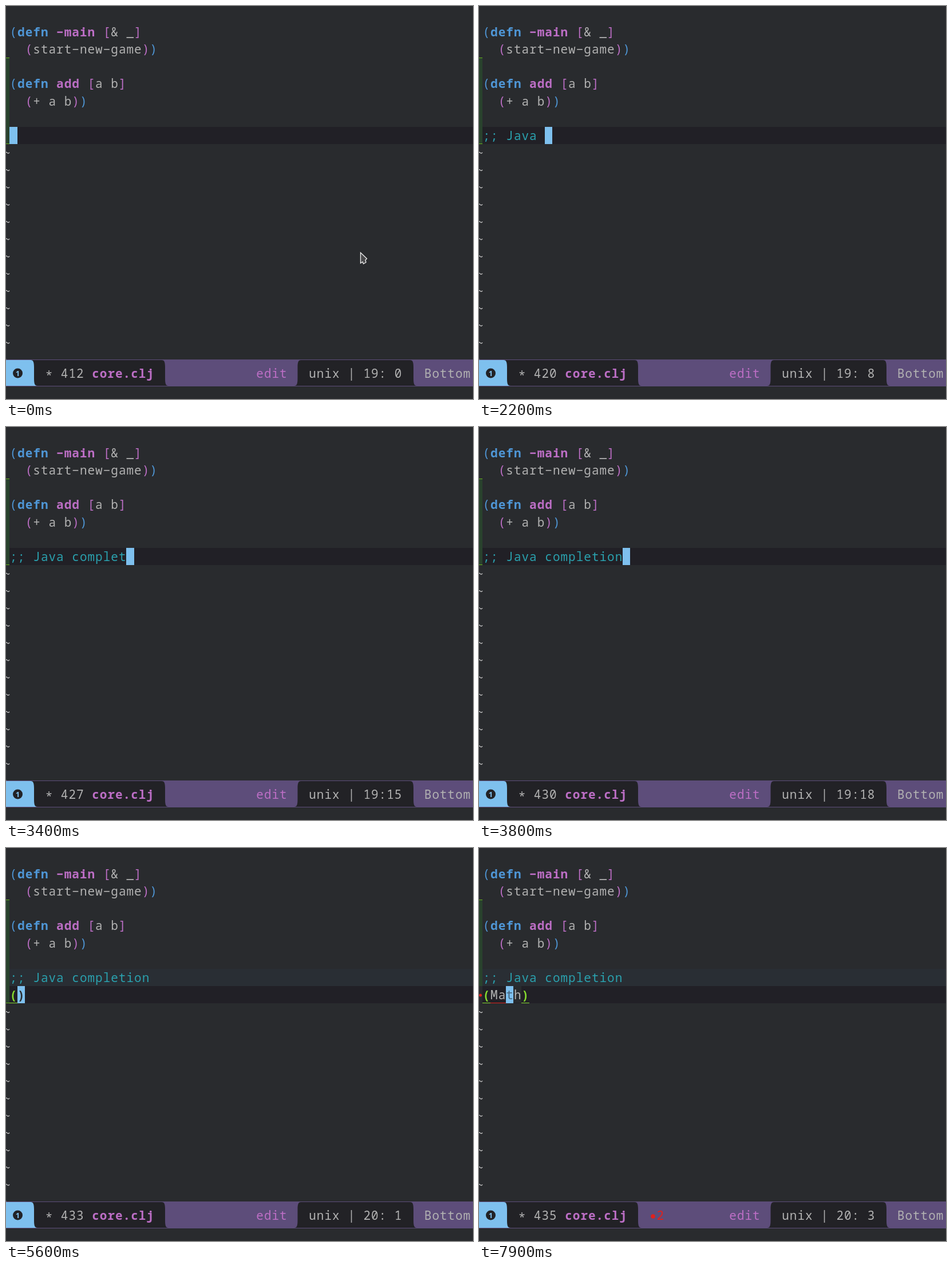
Write an HTML page with a canvas that moves like this. It is 816 px wide and 686 px high and loops after 8000 ms.

```html
<!DOCTYPE html>
<html lang="en">
<head>
<meta charset="utf-8">
<title>Editor typing</title>
<style>
  html, body { margin: 0; width: 100%; height: 100%; overflow: hidden; background: #292b2e; }
  canvas { display: block; }
</style>
</head>
<body>
<canvas id="stage" width="816" height="686"></canvas>
<script>
const ctx = document.getElementById('stage').getContext('2d');
const W = 816, H = 686, LOOP = 8000;
const LEFT = 6, CELL = 13.6, LINE = 30.15;
const BAR_TOP = 617, BAR_END = 663, BAR_BASE = 649;
const C = {
  bg: '#292b2e', dark: '#212026', bar: '#222226', purple: '#5d4d7a', text: '#b2b2b2',
  blue: '#4f97d7', pink: '#bc6ec5', comment: '#2aa1ae', commentBg: '#292e34',
  cursor: '#7ec0ee', match: '#86dc2f', red: '#e0211d', green: '#67b11d', greenBg: '#29422d'
};
const COMMENT = ';; Java completion';
const KEY_TIMES = [1000, 1100, 1300, 1700, 1900, 2000, 2100, 2200, 2300, 2400,
  2800, 2900, 3000, 3100, 3400, 3500, 3600, 3800];

const colX = col => LEFT + col * CELL;
const rowY = row => row * LINE;

function rect(x, y, w, h, color) {
  ctx.fillStyle = color;
  ctx.fillRect(x, y, w, h);
}

// Monospaced text: one glyph per cell, with wide hyphens.
function put(str, x, y, color = C.text, bold = false) {
  ctx.font = `${bold ? 'bold ' : ''}21px "Noto Sans Mono", monospace`;
  ctx.textAlign = 'center';
  ctx.fillStyle = color;
  [...str.replace(/-/g, '\u2212')].forEach((ch, i) => ctx.fillText(ch, x + (i + .5) * CELL, y));
}

function code(row, col, ...spans) {
  for (const [str, color, bold] of spans) {
    put(str, colX(col), rowY(row) + 22.8, color, bold);
    col += str.length;
  }
}

function underline(row, col, count, color) {
  rect(Math.round(colX(col)), Math.round(rowY(row + 1)) - 1, Math.round(count * CELL), 1, color);
}

function tilde(row) {
  const y = rowY(row) + 15;
  ctx.beginPath();
  ctx.moveTo(0, y - 1);
  ctx.quadraticCurveTo(1.5, y - 1, 2.5, y + .5);
  ctx.quadraticCurveTo(4, y + 2, 6, y - .5);
  ctx.strokeStyle = '#d4d4d4';
  ctx.lineWidth = 1.2;
  ctx.stroke();
}

function dot(x, y, r, color) {
  ctx.beginPath();
  ctx.arc(x, y, r, 0, 7);
  ctx.fillStyle = color;
  ctx.fill();
}

// Fills the status bar to the right of a wave-shaped divider.
function segment(x, color, lean) {
  const top = BAR_TOP + 1;
  ctx.beginPath();
  ctx.moveTo(x - 6 * lean, top);
  ctx.bezierCurveTo(x - lean, top, x, top + 4, x, top + 13);
  ctx.lineTo(x, BAR_END - 13);
  ctx.bezierCurveTo(x, BAR_END - 4, x + lean, BAR_END, x + 6 * lean, BAR_END);
  ctx.lineTo(W, BAR_END);
  ctx.lineTo(W, top);
  ctx.fillStyle = color;
  ctx.fill();
}

function statusBar(size, line, col, checking, errors) {
  rect(0, BAR_TOP, W, H - BAR_TOP, C.bg);
  rect(0, BAR_TOP, W, BAR_END - BAR_TOP, C.cursor);
  segment(49, C.bar, 1);
  segment(checking ? 277 : 278, C.purple, checking ? -1 : 1);
  segment(509.5, C.bar, -1);
  segment(712, C.purple, 1);
  rect(0, BAR_TOP, W, 1, C.purple);
  rect(0, BAR_END, W, 1, C.purple);

  dot(20.5, 641, 8.5, C.bar);
  ctx.font = 'bold 13px "Noto Sans", sans-serif';
  ctx.fillStyle = C.cursor;
  ctx.fillText('1', 20.5, 645.7);

  put('*', 68.2, BAR_BASE + 4);
  put(String(size), 95.3, BAR_BASE);
  put('core.clj', 149.7, BAR_BASE, C.pink, true);
  if (errors) {
    dot(304, 643, 3.8, C.red);
    put('2', 310, BAR_BASE, C.red);
  }
  put('edit', 436.8, BAR_BASE, C.pink);
  put(`unix | ${line}:${String(col).padStart(2)}`, 528.7, BAR_BASE);
  put('Bottom', 730.3, BAR_BASE);
}

function pointer(t) {
  const p = Math.min(4, Math.floor(t / 100)) / 4;
  ctx.save();
  ctx.translate(619.5 + 35 * p, 430.5 + 36 * p);
  ctx.beginPath();
  [[0, 0], [11, 10.5], [8.5, 13], [9.5, 17], [5, 19.5], [3.5, 16], [0, 18.5]]
    .forEach(([x, y]) => ctx.lineTo(x, y));
  ctx.closePath();
  ctx.fillStyle = '#4a4a4c';
  ctx.fill();
  ctx.strokeStyle = '#eeeeee';
  ctx.lineWidth = 1.3;
  ctx.stroke();
  ctx.restore();
}

function draw(t) {
  const typed = KEY_TIMES.filter(k => t >= k).length;
  const newline = t >= 4500, form = t >= 5300;
  const arg = t < 5800 ? '' : t < 6900 ? 'MA' : t < 7800 ? 'M' : 'Ma';
  const preview = t >= 7900;
  const checked = t >= 6700;
  const row = newline ? 8 : 7;
  const col = newline ? (form ? 1 + arg.length : 0) : typed;
  const size = 412 + typed + (newline ? 1 : 0) + (form ? 2 + arg.length : 0);

  rect(0, 0, W, H, C.bg);

  const gutterEnd = Math.round(rowY(t >= 4900 ? 9 : 8));
  rect(0, 90, 6, gutterEnd - 90, C.greenBg);
  rect(0, 90, 6, 1, C.green);
  rect(0, gutterEnd - 1, 6, 1, C.green);
  for (let r = row + 1; r <= 20; r++) tilde(r);

  if (newline) rect(LEFT, 211, W, 30, C.commentBg);
  rect(LEFT, Math.round(rowY(row)), W, 30, C.dark);

  code(1, 0, ['(', C.blue], ['defn', C.blue, true], [' '], ['-main', C.pink, true], [' '],
    ['[', C.pink], ['& _'], [']', C.pink]);
  code(2, 2, ['(', C.pink], ['start-new-game'], [')', C.pink], [')', C.blue]);
  code(4, 0, ['(', C.blue], ['defn', C.blue, true], [' '], ['add', C.pink, true], [' '],
    ['[', C.pink], ['a b'], [']', C.pink]);
  code(5, 2, ['(', C.pink], ['+ a b'], [')', C.pink], [')', C.blue]);
  code(7, 0, [COMMENT.slice(0, typed), C.comment]);

  if (preview) rect(colX(col), Math.round(rowY(8)), 2 * CELL, 29, C.bg);
  const cursorX = Math.round(colX(col));
  rect(cursorX, Math.round(rowY(row)), Math.round(colX(col + 1)) - cursorX, 30, C.cursor);

  if (form) {
    const matched = t >= 5500;
    code(8, 0, ['(', matched ? C.match : C.blue, matched], [arg]);
    if (matched) underline(8, 0, 1, C.match);
    if (checked) {
      // The error mark takes the place of the change bar on this line.
      rect(0, 241, LEFT, 30, C.bg);
      underline(8, 1, arg.length, C.red);
      dot(2.5, 257, 2.5, C.red);
    }
    if (preview) {
      code(8, col, ['t', '#45637c'], ['h'], [')', C.match, true]);
      underline(8, col + 2, 1, C.match);
    } else {
      code(8, col, [')', C.bg, t >= 5600]);
    }
  }

  const checking = (t >= 4300 && t < 4900) || (t >= 6700 && t < 6900) || (t >= 7400 && t < 7800);
  statusBar(size, newline ? 20 : 19, col, checking, t >= 6900 && !checking);
  if (t < 1000) pointer(t);
}

const start = performance.now();
function tick() {
  draw((performance.now() - start) % LOOP);
  requestAnimationFrame(tick);
}
tick();
</script>
</body>
</html>
```
